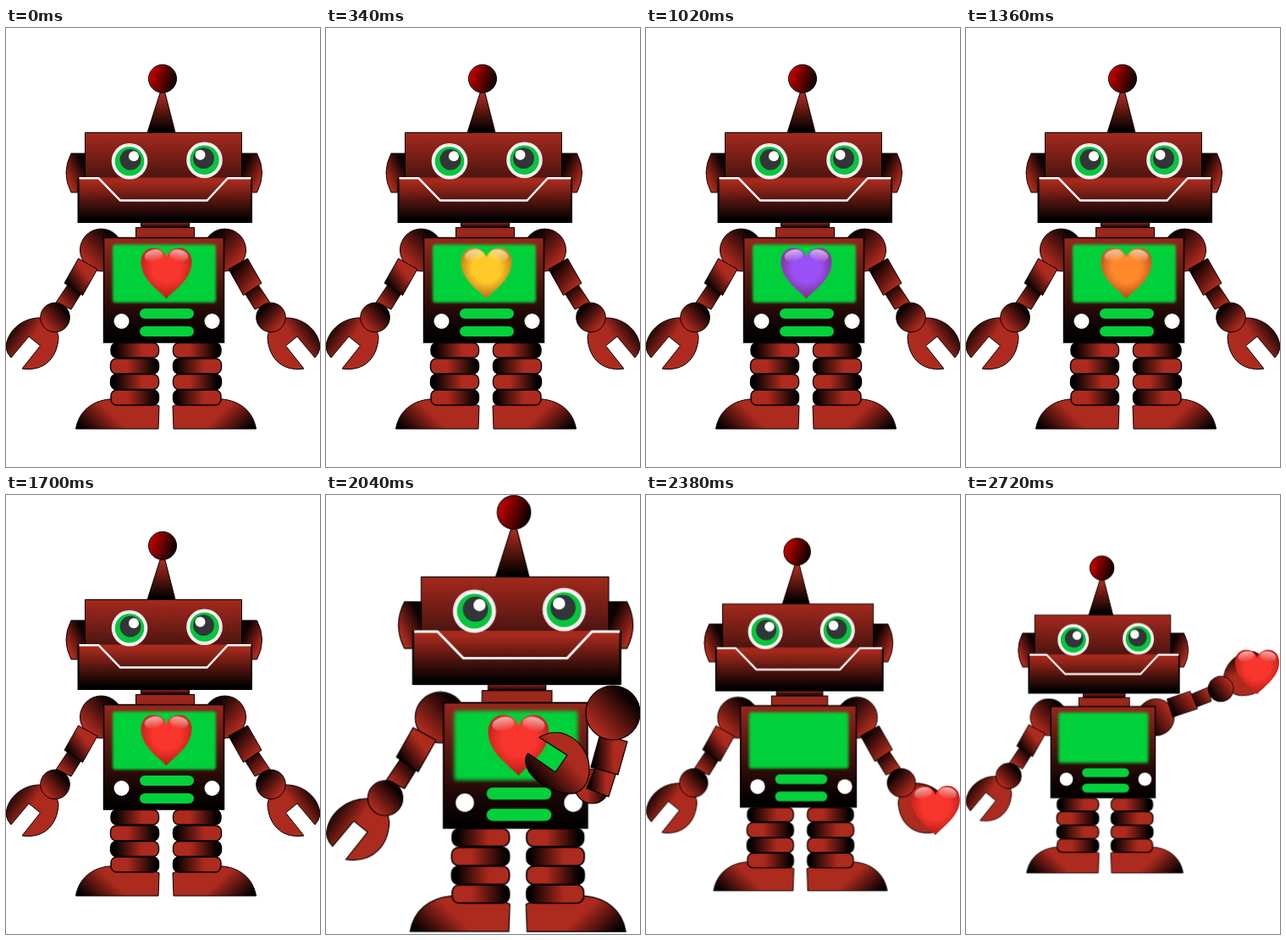
Write an HTML page that moves like this. It is 371 px wide and 518 px high and loops after 3.06 s.

```html
<!DOCTYPE html>
<html lang="en">
<head>
<meta charset="utf-8">
<title>Robot giving a heart</title>
<style>
html, body { margin: 0; width: 100%; height: 100%; overflow: hidden; background: #fff; }
svg { display: block; width: 371px; height: 518px; }
.robot, .arm, .heart, .tint, .reach { animation: 3060ms step-end infinite; }
.robot { animation-name: zoom; }
.arm { animation-name: raise; transform-origin: 258.5px 262px; }
.heart { animation-name: carry; }
.tint { animation-name: tint; }
.reach { animation-name: reach; visibility: hidden; }

@keyframes zoom {
  0% { transform: none; }
  66.66% { transform: matrix(1.197, 0, 0, 1.197, .6, -51.1); }
  77.77% { transform: matrix(.963, 0, 0, .9685, .4, 8.9); }
  88.88%, 100% { transform: matrix(.868, 0, 0, .871, 0, 34); }
}
@keyframes raise {
  0% { transform: none; visibility: visible; }
  66.66% { visibility: hidden; transform: none; }
  77.77% { visibility: visible; transform: none; }
  88.88%, 100% { visibility: visible; transform: rotate(-79deg); }
}
@keyframes reach {
  0% { visibility: hidden; }
  66.66% { visibility: visible; }
  77.77%, 100% { visibility: hidden; }
}
@keyframes carry {
  0% { transform: translate(189.5px, 289.5px); }
  77.77% { transform: translate(354.7px, 375px); }
  88.88%, 100% { transform: translate(396.3px, 200.7px); }
}
@keyframes tint {
  0% { fill: #f9362d; }
  11.11% { fill: #ffc928; }
  22.22% { fill: #3c9df5; }
  33.33% { fill: #9a50f5; }
  44.44% { fill: #ff8a2b; }
  55.55%, 100% { fill: #f9362d; }
}
</style>
</head>
<body>
<svg viewBox="0 0 371 518">
  <defs>
    <linearGradient id="right"><stop offset=".08"/><stop offset=".65" stop-color="#ad2a1e"/></linearGradient>
    <linearGradient id="left"><stop offset=".35" stop-color="#ad2a1e"/><stop offset=".95"/></linearGradient>
    <linearGradient id="joint" x1=".15" y1=".75" x2=".75" y2=".2"><stop stop-color="#ad2a1e"/><stop offset="1" stop-color="#0c0202"/></linearGradient>
    <linearGradient id="rise" x1=".15" y1=".8" x2=".75" y2=".3"><stop/><stop offset=".8" stop-color="#ad2a1e"/></linearGradient>
    <linearGradient id="down" x2="0" y2="1"><stop offset=".1" stop-color="#a5291d"/><stop offset=".95"/></linearGradient>
    <linearGradient id="face" x2="0" y2="1"><stop stop-color="#a5291d"/><stop offset="1" stop-color="#4c1510"/></linearGradient>
    <linearGradient id="chest" x2="0" y2="1"><stop stop-color="#98271c"/><stop offset=".8" stop-color="#130504"/><stop offset="1"/></linearGradient>
    <linearGradient id="claw" x1=".05" y1=".1" x2=".8" y2=".6"><stop offset=".05"/><stop offset=".6" stop-color="#ad2a1e"/></linearGradient>
    <linearGradient id="foot" x1="0" y1=".8" x2=".8" y2=".5"><stop/><stop offset=".6" stop-color="#ad2a1e"/></linearGradient>
    <linearGradient id="ball" y2=".35"><stop offset=".1" stop-color="#cf0000"/><stop offset="1" stop-color="#160202"/></linearGradient>
    <radialGradient id="shade" cy=".4" r=".62"><stop offset=".45" stop-color="#600" stop-opacity="0"/><stop offset="1" stop-color="#600" stop-opacity=".5"/></radialGradient>
    <linearGradient id="gloss" x2="0" y2="1"><stop stop-color="#fff" stop-opacity=".65"/><stop offset="1" stop-color="#fff" stop-opacity="0"/></linearGradient>
    <filter id="soft"><feGaussianBlur stdDeviation="1.6"/></filter>
    <path id="shape" d="M0 30C-6 22-30 8-30-13C-30-24-23-30-15-30C-7-30-2-25 0-19C2-25 7-30 15-30C23-30 30-24 30-13C30 8 6 22 0 30Z"/>

    <g id="limb" stroke="#000">
      <circle cx="112.5" cy="262" r="25" fill="url(#joint)"/>
      <path d="M74.7 300.4L91 309.6 77 332 59 324Z" fill="url(#joint)"/>
      <path d="M42 342C20 341 1 357 0 377Q1 384 6 389L27 364 40.500 375 19 402C46 406 61 388 62 365C60 352 54 343 42 342Z" fill="url(#claw)"/>
      <circle cx="58" cy="341.5" r="17.3" fill="url(#joint)"/>
    </g>
    <path id="upper" d="M85.5 272L108 284.5 90.5 315.5 69 301Z" stroke="#000"/>
    <g id="leg" stroke="#000">
      <path d="M82.5 473C86 452 102 440 122 438C145 438.500 168 440 181 446L180 473Z" fill="url(#foot)"/>
      <g stroke-width="1.4">
        <rect x="124" y="371.5" width="56.5" height="17.5" rx="7" fill="url(#right)"/>
        <rect x="123.5" y="390" width="57" height="18" rx="7" fill="url(#left)"/>
        <rect x="123.5" y="408.5" width="57" height="18" rx="7" fill="url(#right)"/>
        <rect x="124" y="427" width="56.5" height="18" rx="7" fill="url(#left)"/>
      </g>
    </g>
    <path id="ear" d="M95 148H77Q65 171 77 194H95Z" fill="url(#joint)" stroke="#000"/>
    <g id="eye">
      <circle r="21.3" fill="#fff"/>
      <circle r="20" fill="none" stroke="#dedede"/>
      <circle r="17.3" fill="#06c63c"/>
      <circle cx="1" cy="-2" r="12.4" fill="#333538"/>
      <circle cx="5" cy="-6" r="6" fill="#fff"/>
    </g>
  </defs>

  <g class="robot">
    <use href="#limb"/>
    <use href="#upper" fill="url(#rise)"/>
    <g class="arm">
      <g transform="matrix(-1 0 0 1 371 0)">
        <use href="#limb"/>
        <use href="#upper" fill="url(#joint)"/>
      </g>
    </g>

    <use href="#leg"/>
    <use href="#leg" transform="matrix(-1 0 0 1 378 0)"/>

    <g stroke="#000">
      <rect x="159.5" y="228" width="57" height="8" fill="url(#down)"/>
      <rect x="153.5" y="235.5" width="69" height="12" fill="#9c271c"/>
      <rect x="115.5" y="247.5" width="142" height="123.5" fill="url(#chest)" stroke-width="1.5"/>
    </g>
    <g fill="#03d13b">
      <rect x="126" y="255.5" width="122" height="68.5" rx="3" filter="url(#soft)"/>
      <rect x="158" y="331" width="64" height="12" rx="6"/>
      <rect x="158" y="352" width="64" height="12" rx="6"/>
    </g>
    <g fill="#fff">
      <circle cx="136.5" cy="346" r="9"/>
      <circle cx="243.5" cy="346" r="9"/>
    </g>

    <use href="#ear"/>
    <use href="#ear" transform="matrix(-1 0 0 1 373.5 0)"/>
    <g stroke="#000">
      <path d="M182.500 75H187.500L200 123.500H167Z" fill="url(#down)"/>
      <circle cx="185" cy="59.800" r="16.500" fill="url(#ball)"/>
      <rect x="93.500" y="123.500" width="185" height="54" fill="url(#face)"/>
      <path d="M85.500 176.500V229H290V176.500" fill="url(#down)" stroke-width="2"/>
    </g>
    <path d="M86.500 177.300H109.500L135 203.500H237.500L262 177.300H289.500" fill="none" stroke="#fff" stroke-width="2.4"/>
    <use href="#eye" x="146" y="157.200"/>
    <use href="#eye" transform="matrix(-1 0 0 1 234.500 155.700)"/>

    <g class="heart">
      <use href="#shape" class="tint"/>
      <use href="#shape" fill="url(#shade)"/>
      <g fill="url(#gloss)">
        <ellipse cx="-15" cy="-21" rx="11" ry="7" transform="rotate(-12 -15 -21)"/>
        <ellipse cx="15" cy="-21" rx="11" ry="7" transform="rotate(12 15 -21)"/>
      </g>
    </g>
  </g>

  <g class="reach" stroke="#000" stroke-width="1.2">
    <circle cx="314.500" cy="343.500" r="20.500" fill="url(#left)"/>
    <path d="M321 316L344 324 334 356 308 346Z" fill="url(#right)"/>
    <path d="M324 282L356 291 345 330 313 321Z" fill="url(#right)"/>
    <circle cx="339" cy="257" r="32" fill="url(#joint)"/>
    <path d="M252 286Q263 279 277 280.500C298 285 313 306 311 328Q309 346 294 352C267 354 239 335 236 316Q235 309 239 305L271 327 285 307Z" fill="url(#rise)"/>
  </g>
</svg>
</body>
</html>
```
